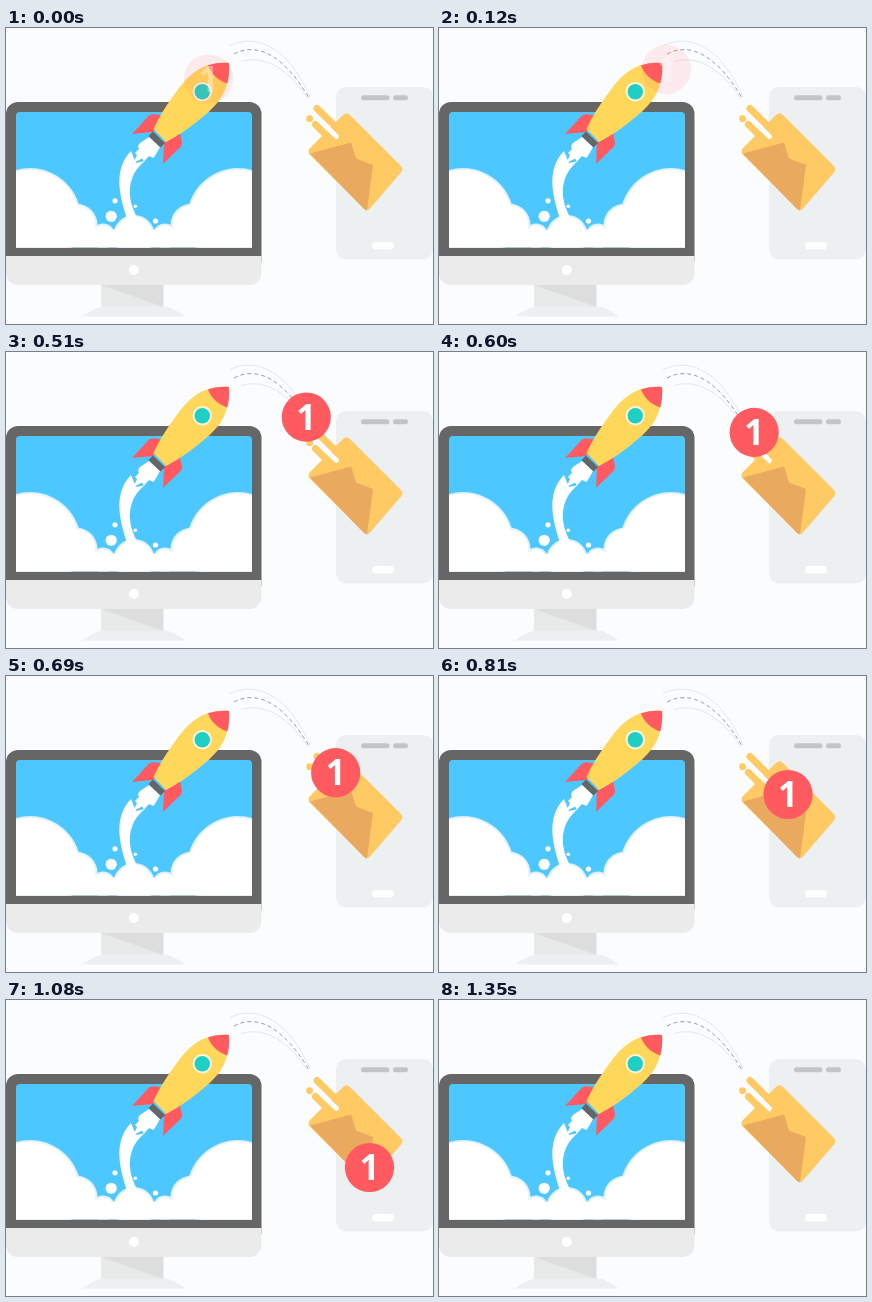
An HTML page with a canvas that plays this animation: 427 px wide and 296 px high, repeating every 1740 ms.

```html
<!DOCTYPE html>
<html lang="en">
<head>
<meta charset="utf-8">
<title>Launch notification</title>
<style>
html, body { margin: 0; width: 100%; height: 100%; overflow: hidden; background: #fbfcfe; }
canvas { display: block; }
</style>
</head>
<body>
<canvas id="stage" width="427" height="296"></canvas>
<script>
const W = 427, H = 296, LOOP = 1740, STEP = 30, BADGE_END = 1350;
const RED = '#ff5a60', YELLOW = '#ffd75b', GOLD = '#ffca64', OCHRE = '#e9a95f';
const GREY = '#666666', PALE = '#ecf0f1', SKY = '#4dc7ff', BACK = '#fbfcfe';

const ctx = document.getElementById('stage').getContext('2d');
const scene = document.createElement('canvas');
scene.width = W;
scene.height = H;

function painter(c) {
  return {
    path(d, color) {
      c.fillStyle = color;
      c.fill(new Path2D(d));
    },
    box(x, y, w, h, r, color) {
      c.fillStyle = color;
      c.beginPath();
      c.roundRect(x, y, w, h, r);
      c.fill();
    },
    dot(x, y, r, color) {
      c.fillStyle = color;
      c.beginPath();
      c.arc(x, y, r, 0, Math.PI * 2);
      c.fill();
    },
    line(d, color, width, dash = [], cap = 'butt') {
      c.strokeStyle = color;
      c.lineWidth = width;
      c.lineCap = cap;
      c.setLineDash(dash);
      c.stroke(new Path2D(d));
    }
  };
}

function drawPhone(p) {
  p.box(330, 59, 97, 172.5, 10, PALE);
  p.box(355, 67.3, 28.5, 5, 2.5, '#c1c5c6');
  p.box(387, 67.3, 15, 5, 2.5, '#c1c5c6');
  p.box(366, 214, 22, 7.5, 3.7, '#ffffff');
}

function drawMonitor(p) {
  p.path('M95 256H157.500V279H95Z', '#dddddd');
  p.path('M95 257L157.500 279H95Z', '#e8e9e9');
  p.path('M76 288.500Q82 284 92 279.500Q94 278.500 97 278.500H159Q162 278.500 164 279.500Q174 284 180 288.500Z', PALE);
  p.box(0, 74, 255.5, 160, [12, 12, 0, 0], GREY);
  p.box(0, 228, 255.5, 29, [0, 0, 12, 12], '#ebebeb');
  p.dot(127.8, 242, 5, '#ffffff');
  p.box(10, 84, 236, 135.5, [4, 4, 0, 0], SKY);
}

function drawClouds(c, p) {
  const puffs = [[24, 191, 49], [70, 197, 19.5], [97, 208, 10.5]];
  const layer = (grow, color) => {
    for (const [x, y, r] of puffs) {
      p.dot(x, y, r + grow, color);
      p.dot(256 - x, y, r + grow, color);
    }
    p.dot(128, 208, 19 + grow, color);
  };
  c.save();
  c.beginPath();
  c.rect(10, 84, 236, 135.5);
  c.clip();
  layer(2, '#e2f2fa');
  layer(0, '#ffffff');
  p.box(10, 202, 236, 18, 0, '#ffffff');
  p.path('M125 123C116 132 112.500 145 113.500 158C114.500 171 118 181 121 191H132C126 180 123 170 124 160C125 149 130 140 139 133L130 135Z', '#ffffff');
  p.dot(105.2, 188.3, 5.6, '#ffffff');
  p.dot(109, 172.8, 2.6, '#ffffff');
  p.dot(129.3, 178.3, 1.8, '#ffffff');
  p.dot(149.5, 193, 2.6, '#ffffff');
  c.restore();
}

function drawRocket(p) {
  p.path('M143 109L134 115Q131 118 133 121L129 125L131 127L127.500 135L136 130.500L138 133.500L143 128L147.500 130Q151 125 154 119Z', '#ffffff');
  p.path('M126 106L143 87.500Q145 86 148 86.200L160 88L147 104Z', RED);
  p.path('M157 136L174.500 119Q176.500 117 176 114L174 105L158 115Z', RED);
  p.path('M147.500 101C152 91 159 79 168 67C179 51 190 39 207 36C213 34.800 219 34.500 223 35C223.500 40 223 47 221.500 54C218 70 207 81 193 92C181 102 171 108 160 114Z', YELLOW);
  p.path('M202 37.300C209 35 217 34.400 223 35C223.600 42 223 49 221.300 55.500C213 53 205 46 202 37.300Z', RED);
  p.path('M147 103.500L159 115L154.500 119.500L142.500 108Z', GREY);
  p.dot(196.3, 63.7, 9.7, '#fff8e2');
  p.dot(196.3, 63.7, 7.7, '#20cfc3');
}

function drawTrail(p) {
  p.line('M224 17.500C252 4 284 22 304 69', '#dfe1e3', 0.8);
  p.line('M235 33.500C260 26 284 43 302 71', '#dfe1e3', 0.8);
  p.line('M228 26C252 13 279 29 303 70', '#9c9ea0', 1, [4, 3]);
}

function drawMail(p) {
  p.line('M311 80.500L342 111', GOLD, 7, [], 'round');
  p.line('M309.500 96.500L328 115', GOLD, 7, [], 'round');
  p.dot(303.6, 90.7, 3.4, GOLD);
  p.path('M337 87Q340.500 83.500 344 87L394.500 137.500Q398 141 395 144.500L364 180.500Q361 184 357.500 180L304 127Q301 123.500 304 120Z', GOLD);
  p.line('M313 91.500L330.500 108.500', BACK, 5, [], 'round');
  p.path('M304 125.500L345 114.500L350 130.500L367 137L361 182.500Q359 182 357 180Z', OCHRE);
}

// Waypoints: time, x, y; constant speed between them.
const ROUTE = [
  [0, 202.5, 51],
  [270, 258.5, 29.5],
  [540, 305.5, 69.5],
  [900, 363.5, 134.8],
  [1080, 363.5, 167.5]
];

function place(t) {
  for (let i = 1; i < ROUTE.length; i++) {
    const [t0, x0, y0] = ROUTE[i - 1], [t1, x1, y1] = ROUTE[i];
    if (t <= t1) {
      const k = (t - t0) / (t1 - t0);
      return [x0 + (x1 - x0) * k, y0 + (y1 - y0) * k];
    }
  }
  return ROUTE[ROUTE.length - 1].slice(1);
}

const screen = painter(ctx);

function drawBadge(t) {
  const [x, y] = place(t);
  const fade = Math.min(1, Math.max(0, (t - 270) / 240));
  ctx.save();
  ctx.globalAlpha = 0.11 + 0.89 * fade;
  screen.dot(x, y, 24.6, RED);
  ctx.globalAlpha = 0.4 + 0.6 * fade;
  ctx.fillStyle = '#ffffff';
  ctx.font = '700 35px "Open Sans", "Noto Sans", sans-serif';
  ctx.textAlign = 'center';
  ctx.fillText('1', x, y + 12.5);
  ctx.restore();
}

function drawScene() {
  const c = scene.getContext('2d'), p = painter(c);
  p.box(0, 0, W, H, 0, BACK);
  drawPhone(p);
  drawMonitor(p);
  drawClouds(c, p);
  drawRocket(p);
  drawTrail(p);
  drawMail(p);
}

function frame() {
  const t = Math.floor((performance.now() % LOOP) / STEP) * STEP;
  ctx.drawImage(scene, 0, 0);
  if (t < BADGE_END) drawBadge(t);
  requestAnimationFrame(frame);
}

drawScene();
frame();
</script>
</body>
</html>
```
